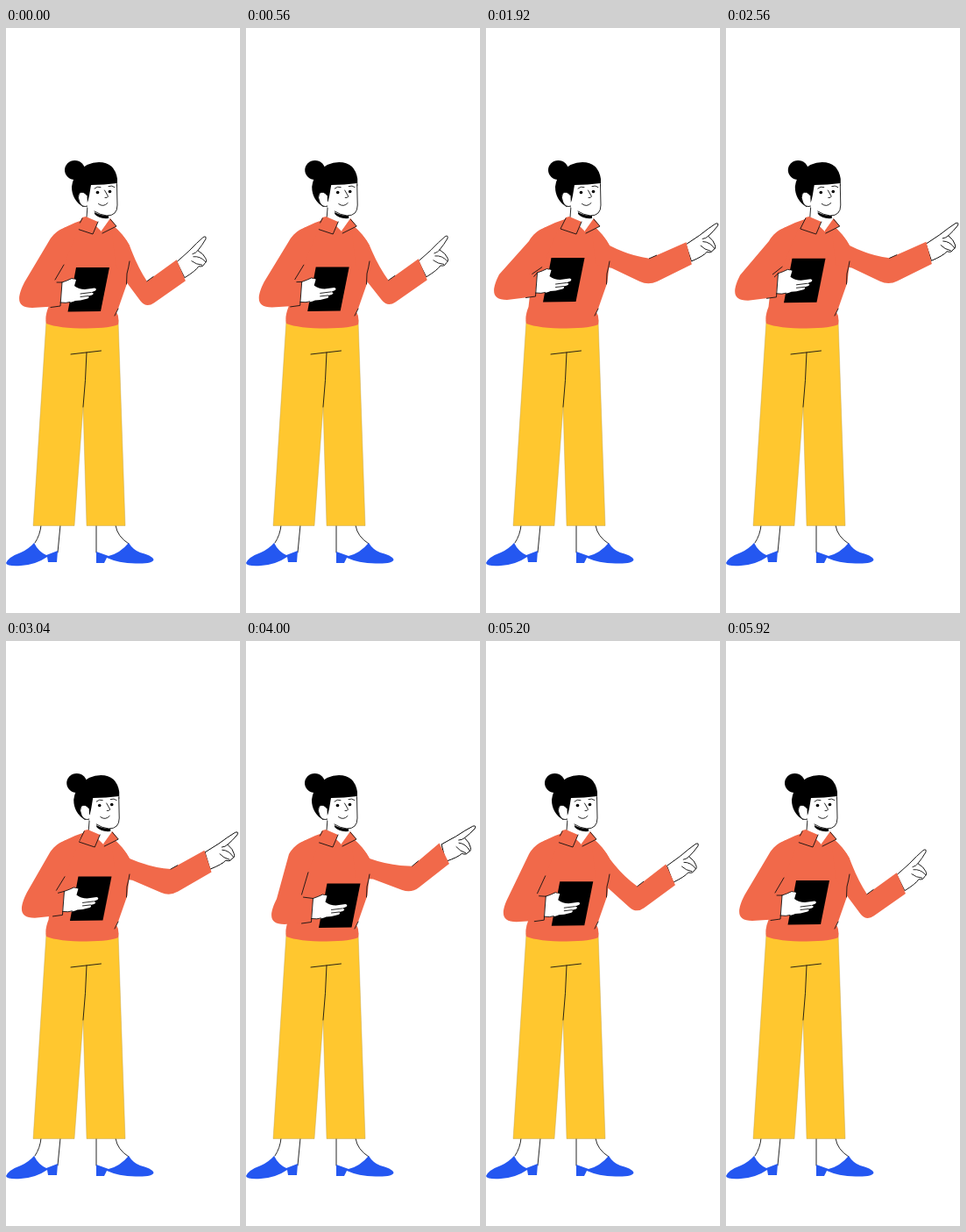
An HTML page that plays this animation: 267 px wide and 667 px high, repeating every 6 s.

```html
<!DOCTYPE html>
<html lang="en">
<head>
<meta charset="utf-8">
<title>Pointing presenter</title>
<style>
html, body { margin: 0; width: 100%; height: 100%; overflow: hidden; background: #fff; }
svg { display: block; width: 100%; height: 100%; }
.top { fill: #f1694a; }
.pants { fill: #ffc72f; stroke: #b99a4a; stroke-width: .4; }
.shoe { fill: #2457f1; }
.skin { fill: #fff; stroke: #000; stroke-width: .9; stroke-linejoin: round; }
.white { fill: #fff; }
.line { fill: none; stroke: #111; stroke-width: .9; stroke-linecap: round; stroke-linejoin: round; }
</style>
</head>
<body>
<svg viewBox="0 0 267 667">
  <!-- legs -->
  <path class="line" d="M40 567Q39 578 33 587M62 567L59 598M103 567V598M125 567Q127 580 140 588"/>
  <path class="shoe" d="M32 587Q37 597 46 601L59 596L58 609H48L47 603Q34 612 17 613Q1 614 0 610Q3 603 17 598Q26 594 32 587Z"/>
  <path class="shoe" d="M140 587Q130 599 117 602L103 597V610H112L115 604Q128 610 148 610.500Q168 611 168.500 606Q166 601 153 598Q145 595 140 587Z"/>
  <path class="pants" d="M46 333L31 567.500H78L88 432L92 567.500H136L128 333Z"/>
  <path class="line" d="M74 372L108.500 368M92 370Q91 402 88 432"/>

  <!-- torso and pointing arm -->
  <path class="top" d="M90 218Q68 225 57 235Q50 243 50 260V305L48.500 318Q44 329 46 337Q60 342.500 92 342.500Q120 342 128 338Q129.500 329 126 324L128 320L138.500 290L141 265V248Q134 235 122 225Z"/>
  <g id="hand">
    <path class="skin" d="M195 267L209 254.500Q218 245 225 239Q229 236.500 228 241Q224 248 219 254Q226 258 228 263Q230 267 226.500 269Q225.500 273 220 272Q217 277 204 285Z"/>
    <path class="line" d="M219 254Q217 257 213 258M214 261Q222 260 228 267M212 266Q217 270 224 270.500"/>
  </g>
  <path class="top" id="sleeveR"/>
  <path class="line" id="creaseR"/>
  <path class="line" d="M141 266Q140 273 138 280L137.500 292M128 320L124 328"/>

  <!-- head and collar -->
  <g id="head">
    <path class="white" d="M93 200V216L109 232L119 218L117 208Z"/>
    <path class="line" d="M93 203L92 216"/>
    <path class="top" d="M91 215L87 216L81 229L99 235L105 221ZM119 217L126 226L110 234L109 231Z"/>
    <path class="line" d="M87 217L81 229L99 235L105 221M119 218L126 226L110 234"/>
    <path d="M101 208Q107 214 117 212V217Q106 218 101 212Z"/>
    <ellipse cx="78.500" cy="162" rx="11.500" ry="11"/>
    <path d="M83 164Q92 153 106 153Q124 153 127 172V180L96 195L88 204Q75 196 75 181Q76 171 83 164Z"/>
    <path class="white" d="M95 191L97 179Q112 179 126.500 177L127 202Q127 214 115 214Q103 213 97 207L92 204Z"/>
    <path class="line" d="M126.500 178L127 202Q127 214 115 214Q107 213 101 209"/>
    <path class="skin" d="M92.500 191Q88 185 83.500 188.500Q81 193 84 199Q87 205 93 203"/>
    <circle cx="104.500" cy="187.500" r="1.800"/><circle cx="118.500" cy="186.500" r="1.800"/>
    <path class="line" d="M101 183Q104 180 108 181.500M117 180.500Q121 179 124 181.500M112.500 185L116.500 192Q116 194 113 193.500M105.500 200.500Q111 205 116 199.500"/>
  </g>

  <!-- arm with the tablet -->
  <path class="top" id="sleeveL"/>
  <path class="line" id="creaseL"/>
  <g id="tablet">
    <path d="M80 273L118 273L108 323L70.500 323.500Z"/>
    <path class="white" d="M64 290Q70 288 75 285.500L80 287L78 294Q83 298 90 298L101 296.500Q104 297 102 299.500L97 301.500Q102 302 98 304.500L94 305.500Q96 308 91 309Q85 311 79 311Q73 314 62 313Z"/>
    <path class="line" d="M64 290Q70 288 75 285.500L77 286M62 313Q69 314 73 312.500M85 303L97 301.500M85 306.500L94 305.500"/>
    <path class="line" d="M64 290L62 317L51 318.500"/>
  </g>
</svg>
<script>
const LOOP = 6000, STEP = 80, SPAN = LOOP / 3;
const SHOULDER = [120, 255], UPPER = 76, FORE = 55, CUFF = 26;

// Each joint passes through three poses: rest, raised, tablet lowered.
const shoulder = [58.4, 30.6, 25.5];
const forearm = [-35, -26, -38];
const wrist = [0, -1, 16];
const headX = [0, 4, 0];
const tabletX = [0, -5.5, 12.5], tabletY = [0, -11, 3.5];
const elbowX = [16, 10, 30], elbowY = [312, 303, 316];

const el = id => document.getElementById(id);
const ease = u => u < .5 ? 4 * u ** 3 : 1 - 4 * (1 - u) ** 3;
const move = (id, value) => el(id).setAttribute('transform', value);
const draw = (id, d) => el(id).setAttribute('d', d);

function at(keys, t, lag = 80) {
  const s = (t - lag + LOOP) % LOOP / SPAN;
  const i = Math.floor(s), from = keys[i], to = keys[(i + 1) % 3];
  return from + (to - from) * ease(s - i);
}

function polar([x, y], deg, r) {
  const a = deg * Math.PI / 180;
  return [x + r * Math.cos(a), y + r * Math.sin(a)];
}

function toward([x, y], [tx, ty], dist) {
  const k = dist / Math.hypot(tx - x, ty - y);
  return [x + (tx - x) * k, y + (ty - y) * k];
}

function pointingArm(t) {
  const up = at(shoulder, t), fore = at(forearm, t, 160);
  const elbow = polar(SHOULDER, up, UPPER), pit = polar(SHOULDER, up + 8, 30);
  const cuffLow = polar(elbow, fore, FORE), cuffTop = polar(cuffLow, fore - 78, CUFF);
  const inner = [elbow[0] + 1, elbow[1] - 31];
  const bend = [(141 + inner[0]) / 2 - 1, (248 + inner[1]) / 2 + 4];
  draw('sleeveR', `M120 224Q134 235 141 248Q${bend} ${inner}L${cuffTop}L${cuffLow}` +
    `L${toward(elbow, cuffLow, 11)}Q${elbow} ${toward(elbow, pit, 11)}L${pit}L125 270Z`);
  draw('creaseR', `M${inner}L${toward(inner, cuffTop, 9)}`);
  move('hand', `translate(${elbow}) rotate(${fore - forearm[0]}) translate(-160 -320) ` +
    `rotate(${at(wrist, t, 160)} 200 275)`);
}

function tabletArm(t) {
  const x = at(tabletX, t), y = at(tabletY, t);
  const ex = at(elbowX, t), ey = at(elbowY, t);
  const near = (dx, dy) => `${ex + dx} ${ey + dy}`;
  const cuff = `${64 + x} ${290 + y}`;
  const fold = `${66 + x * .4} ${270 - x * .5}`;
  const bx = 56 + x * .6, by = 287 + y * .6;
  draw('sleeveL', `M86 222C70 226 58 228 49 243L${near(5, -22)}` +
    `C${near(-4, -4)} ${near(-4, 7)} ${near(14, 7)}` +
    `L${62 + x} ${317 + y}L${cuff}L${bx} ${by}L${fold}Z`);
  draw('creaseL', `M${fold}L${bx} ${by}M${bx + 2} ${by + 3}L${cuff}`);
  move('tablet', `translate(${x} ${y})`);
}

const start = performance.now();
function frame(now) {
  const t = Math.floor(Math.max(0, now - start) % LOOP / STEP) * STEP;
  move('head', `translate(${at(headX, t)} 0)`);
  pointingArm(t);
  tabletArm(t);
  requestAnimationFrame(frame);
}
frame(start);
</script>
</body>
</html>
```
